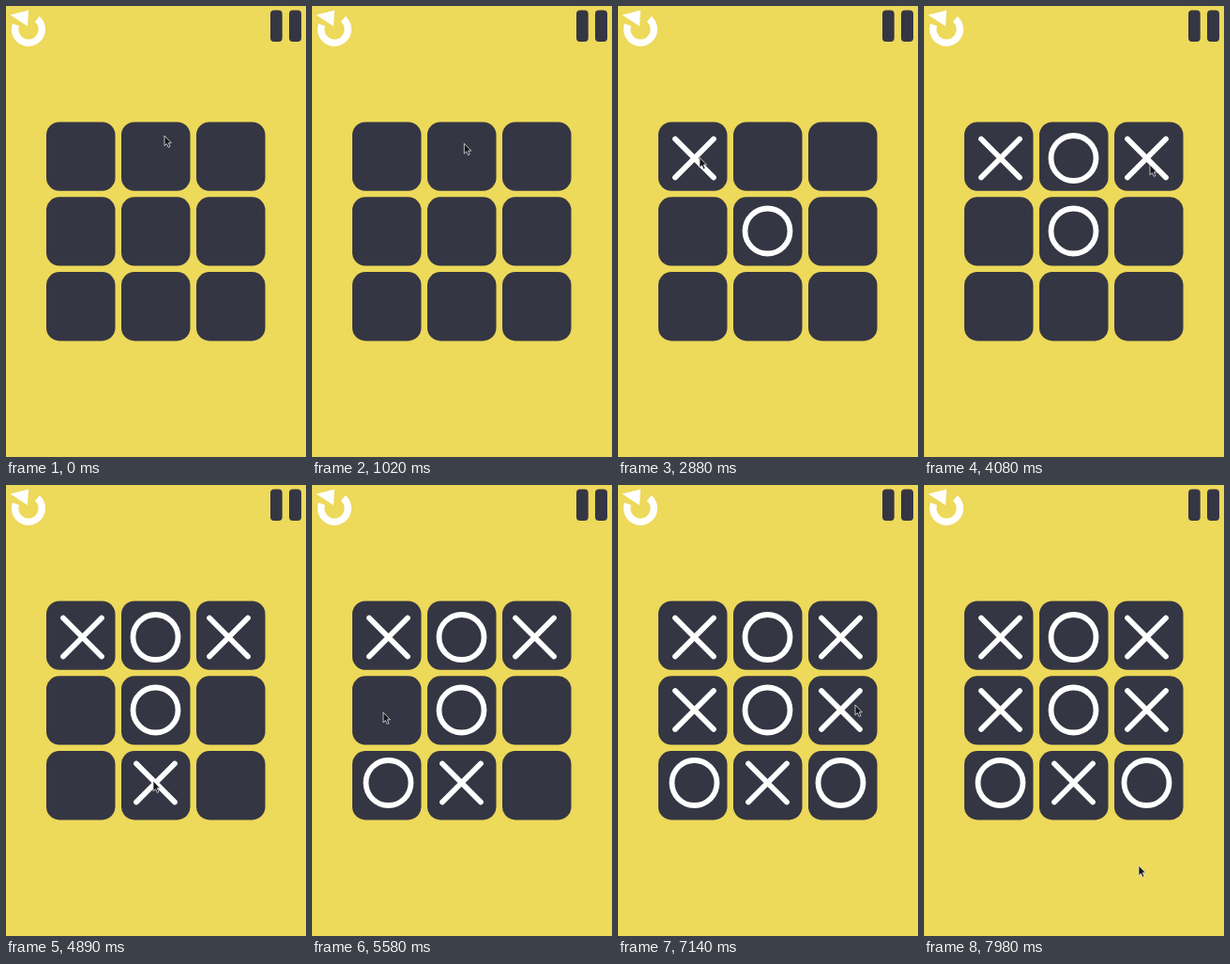
These frames come from a looping animation (320 px wide and 480 px high, 8000 ms). An HTML page:

```html
<!DOCTYPE html>
<html lang="en">
<head>
<meta charset="utf-8">
<title>Tic-tac-toe</title>
<style>
  html, body { margin: 0; width: 100%; height: 100%; overflow: hidden; background: #edd95a; }
  svg { display: block; width: 100%; height: 100%; }
  .tile { fill: #353643; }
  .mark { fill: none; stroke: #fff; stroke-width: 5.8; stroke-linecap: round; }
</style>
</head>
<body>
<svg viewBox="0 0 320 480">
  <path d="M33.3 13.9A14.4 14.4 0 1 1 10.4 20" fill="none" stroke="#fff" stroke-width="7.4"/>
  <path d="M4.5 9.5L24 4.5L23 21.5Z" fill="#fff"/>
  <rect class="tile" x="282" y="4.5" width="12.7" height="33.5" rx="4"/>
  <rect class="tile" x="302" y="4.5" width="13" height="33.5" rx="4"/>
  <g id="board"></g>
  <path id="cursor" d="M0 0V10.8L2.4 8.6L4.2 12.4L6 11.6L4.3 7.8H7.4Z"
        fill="#15161c" stroke="#e6e6e6" stroke-width="0.8" stroke-linejoin="round"/>
</svg>
<script>
const LOOP = 8000;
const REPLY_DELAY = 260;
const board = document.getElementById('board');
const cursor = document.getElementById('cursor');

// One turn: pointer travel, the cell clicked, and the cell of the reply.
const turns = [
  { leave: 900, arrive: 1590, tip: { x: 87, y: 161 }, click: 1820, cell: 0, reply: 4 },
  { leave: 2880, arrive: 3270, tip: { x: 241, y: 169 }, click: 3810, cell: 2, reply: 1 },
  { leave: 4320, arrive: 4620, tip: { x: 157, y: 315 }, click: 4830, cell: 7, reply: 6 },
  { leave: 5420, arrive: 5580, tip: { x: 76, y: 242 }, click: 5730, cell: 3, reply: 8 },
  { leave: 6540, arrive: 7020, tip: { x: 253, y: 234 }, click: 7050, cell: 5 },
  { leave: 7350, arrive: 7980, tip: { x: 229, y: 405 } }
];
const pointerStart = { x: 169, y: 138 };

function add(tag, attributes) {
  const node = document.createElementNS('http://www.w3.org/2000/svg', tag);
  for (const name in attributes) node.setAttribute(name, attributes[name]);
  return board.appendChild(node);
}

for (let cell = 0; cell < 9; cell++)
  add('rect', {
    class: 'tile', width: 73.5, height: 73.3, rx: 14,
    x: 43 + cell % 3 * 80, y: 123.5 + Math.floor(cell / 3) * 79.8
  });

function addMark(symbol, cell, time) {
  const cx = 81.5 + cell % 3 * 78, cy = 162 + Math.floor(cell / 3) * 77.5;
  const node = symbol === 'O'
    ? add('circle', { class: 'mark', cx, cy, r: 24 })
    : add('path', { class: 'mark', d: `M${cx - 20.5} ${cy - 20.5}l41 41m0 -41l-41 41` });
  return { node, time };
}

const marks = [];
for (const { click, cell, reply } of turns) {
  if (cell !== undefined) marks.push(addMark('X', cell, click));
  if (reply !== undefined) marks.push(addMark('O', reply, click + REPLY_DELAY));
}

// Eases from tip to tip, sagging a little on sideways travel.
function pointerAt(time) {
  let { x, y } = pointerStart;
  for (const { leave, arrive, tip } of turns) {
    const p = Math.min(1, Math.max(0, (time - leave) / (arrive - leave)));
    const eased = p * p * (3 - 2 * p);
    const dx = tip.x - x, dy = tip.y - y;
    x += dx * eased;
    y += dy * eased + 0.15 * Math.abs(dx) * Math.sin(Math.PI * p);
    if (p < 1) break;
  }
  return { x, y };
}

const start = performance.now();
function draw() {
  const time = (performance.now() - start) % LOOP;
  for (const mark of marks)
    mark.node.setAttribute('visibility', time >= mark.time ? 'visible' : 'hidden');
  const { x, y } = pointerAt(time);
  cursor.setAttribute('transform', `translate(${x} ${y})`);
  requestAnimationFrame(draw);
}
draw();
</script>
</body>
</html>
```
